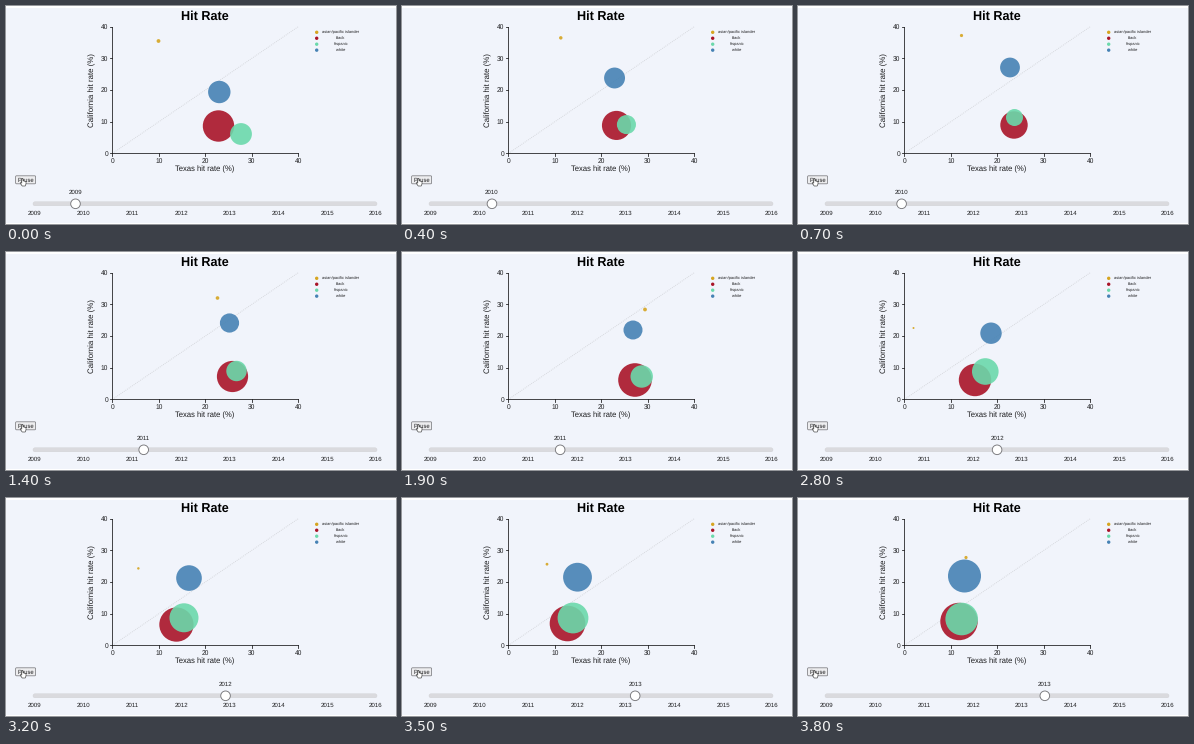
Animation of 390 by 218 pixels, one loop 3.9 s. Source, as a matplotlib script:

```python
import numpy as np
import matplotlib.pyplot as plt
from matplotlib.animation import FuncAnimation
from matplotlib.patches import Circle, FancyBboxPatch, Polygon, Rectangle

plt.rcParams["font.family"] = "Liberation Sans"
plt.rcParams["text.hinting"] = "none"

W, H, DPI = 390, 218, 100
FRAMES, INTERVAL = 39, 100
PT = 72 / DPI  # points per pixel
BG, INK = "#f1f4fb", "#1c1c1e"

fig = plt.figure(figsize=(W / DPI, H / DPI), dpi=DPI, facecolor="white")
ax = fig.add_axes([0, 0, 1, 1])
ax.set_xlim(0, W)
ax.set_ylim(H, 0)
ax.axis("off")


def label(x, y, text, size, ha="center", **kw):
    kw.setdefault("color", INK)
    kw.setdefault("va", "baseline")
    return ax.text(x, y, text, fontsize=size * PT, ha=ha, **kw)


def line(xs, ys, color=INK, width=0.8, **kw):
    return ax.plot(xs, ys, color=color, lw=width * PT, **kw)[0]


def px(v):
    return 106.4 + v * 4.65


def py(v):
    return 147.4 - v * 3.17


ax.add_patch(Rectangle((0, 2.5), W, 214.5, fc=BG, ec="none", zorder=0))

# Chart frame
label(199.3, 13.8, "Hit Rate", 12.6, weight="bold", color="black")
label(199, 165.6, "Texas hit rate (%)", 7.7)
label(90.3, 84, "California hit rate (%)", 7.9, rotation=90, va="center",
      ha="right", rotation_mode="default")
line([px(0), px(40)], [py(0), py(40)], "#d3d5da", 0.9, ls=(0, (1, 1.2)), zorder=1)
line([px(0), px(0)], [py(40), py(0)])
line([px(0), px(40)], [py(0), py(0)])
for v in range(0, 41, 10):
    line([px(v), px(v)], [py(0), py(0) + 2.6])
    line([px(0) - 2.6, px(0)], [py(v), py(v)])
    label(px(v), 156.9, str(v), 6.6)
    label(102.2, py(v) + 2.4, str(v), 6.6, ha="right")

# Bubble path: times in ms, then x, y and radius in pixels
TIMES = [0, 700, 1400, 1900, 2800, 3500, 3800]
GROUPS = {
    "asian/pacific islander": ("#d6a520", [
        (152.5, 163.5, 211.5, 243, 115.5, 145, 168),
        (35, 29.5, 46, 57.5, 76, 66.2, 59.5),
        (1.9, 1.6, 1.8, 1.9, 1.0, 1.4, 1.6)]),
    "black": ("#a91428", [
        (212.5, 216, 226.5, 233, 177, 165.5, 161),
        (120, 119, 124.5, 128, 128, 125.5, 123.5),
        (15.7, 13.7, 15.6, 16.8, 16.2, 17.8, 18.7)]),
    "hispanic": ("#6bd9ab", [
        (235, 216.5, 230.5, 239.7, 187.3, 171, 163.7),
        (128, 111.5, 119, 124.5, 119.5, 120, 121),
        (10.9, 8.5, 10.2, 11.2, 13.3, 15.4, 16.3)]),
    "white": ("#4682b4", [
        (213.3, 212, 223.5, 231, 193, 175.5, 166.5),
        (86, 61.5, 71, 78, 81.2, 79.2, 78),
        (11.2, 9.9, 9.6, 9.5, 10.7, 14.4, 16.5)]),
}

bubbles = []
for i, (name, (color, path)) in enumerate(GROUPS.items()):
    y = 26.3 + 5.95 * i
    ax.add_patch(Circle((310.7, y), 1.7, fc=color, ec="none"))
    label(334.8, y + 1.1, name, 3.95)
    dot = Circle((0, 0), 1, fc=color, ec="none", alpha=0.9, zorder=4 + i)
    ax.add_patch(dot)
    bubbles.append((dot, path))

# Pause button with hand pointer
ax.add_patch(FancyBboxPatch((9.6, 169.8), 20, 8, boxstyle="round,pad=0,rounding_size=1",
                            fc="#ededef", ec="#808084", lw=0.8 * PT))
label(19.6, 175.8, "Pause", 5.9)
hand = [(15.8, 172.4), (16.9, 172.4), (17.1, 174.8), (20, 175.6), (20, 178),
        (19.2, 180), (16.2, 180), (14.2, 177.2), (14.7, 176.5), (15.8, 177.2)]
ax.add_patch(Polygon(hand, fc="white", ec="#333333", lw=0.6 * PT, zorder=8))

# Year slider
TRACK_X, YEAR_W, TRACK_Y = 29, 48.7, 197.8
ax.add_patch(FancyBboxPatch((27, TRACK_Y - 2), 344, 4,
                            boxstyle="round,pad=0,rounding_size=2",
                            fc="#dadade", ec="#d0d0d4", lw=0.4 * PT))
for i in range(8):
    label(TRACK_X + YEAR_W * i, 209.3, str(2009 + i), 6.1)
thumb = Circle((0, TRACK_Y), 4.8, fc="white", ec="#77777b", lw=0.9 * PT, zorder=9)
ax.add_patch(thumb)
year_text = label(0, 188, "", 6.1)


def update(frame):
    t = frame * INTERVAL
    for dot, path in bubbles:
        x, y, r = (np.interp(t, TIMES + [4000], [*p, p[-1] + (p[-1] - p[-2]) / 1.5])
                   for p in path)
        dot.center = x, y
        dot.radius = r
    # The slider ticks twice every three frames
    step = (2 * frame + 2) // 3
    x = 69.5 + 6.82 * step
    thumb.center = x, TRACK_Y
    year_text.set_x(x)
    year_text.set_text(str(2009 + int((x - TRACK_X) / YEAR_W)))
    return [dot for dot, _ in bubbles] + [thumb, year_text]


anim = FuncAnimation(fig, update, frames=FRAMES, interval=INTERVAL,
                     repeat=True, repeat_delay=0, blit=False)
plt.show()
```
